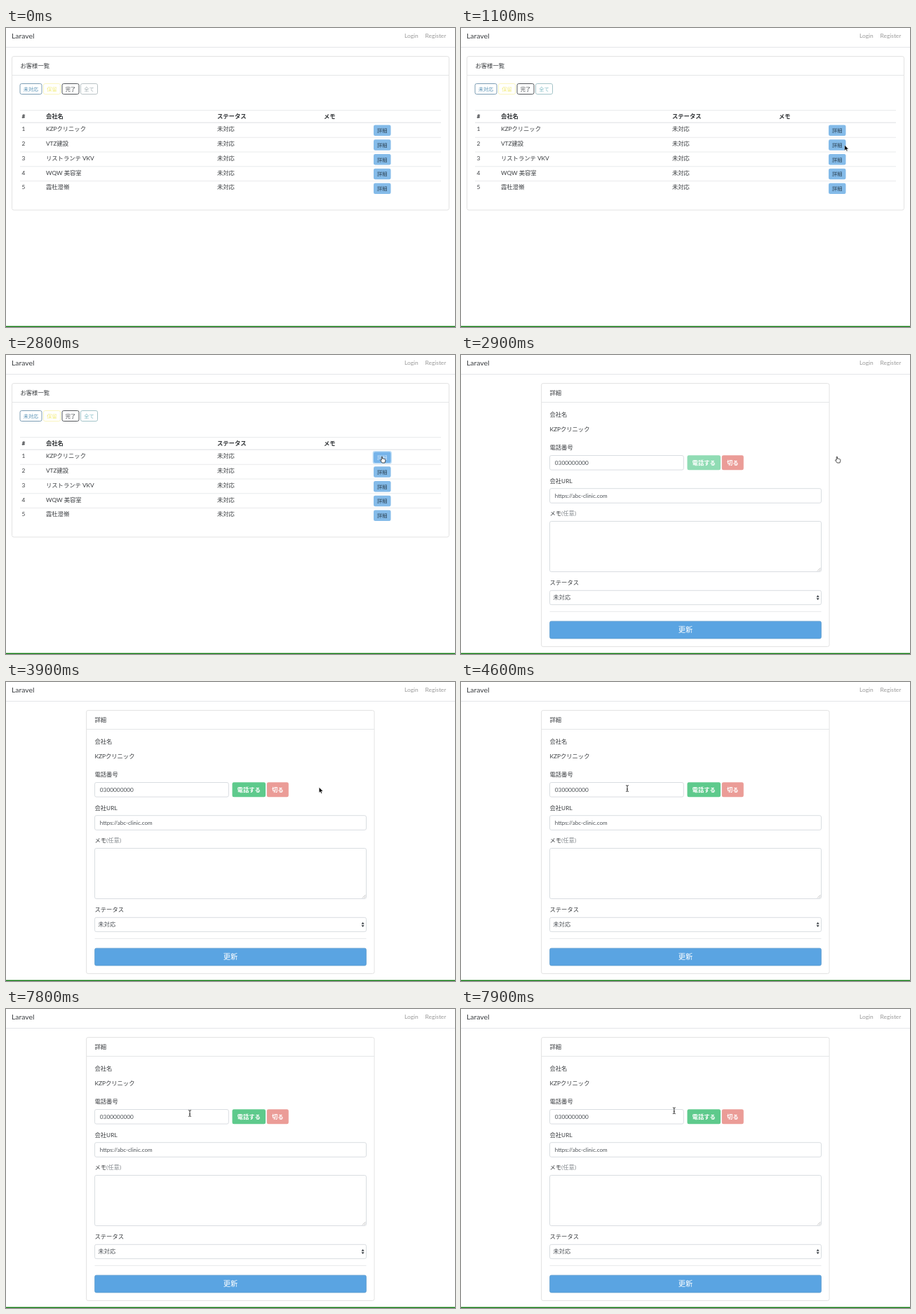
An HTML page that plays this animation: 640x427 px, repeating every 8 s.

```html
<!DOCTYPE html>
<html lang="ja">
<head>
<meta charset="utf-8">
<title>お客様一覧</title>
<style>
  html, body { margin: 0; width: 100%; height: 100%; overflow: hidden; background: #fff; }
  svg { display: block; width: 640px; height: 427px; }
  text { font: 8.3px Lato, "Noto Sans CJK JP", "Noto Sans CJK", sans-serif; fill: #3a3d40; }
  .brand { font-size: 10.4px; }
  .nav { font-size: 8.4px; fill: #999; }
  .head { font-weight: 700; fill: #303336; }
  .small { font-size: 7.2px; }
  .mid { text-anchor: middle; }
  .muted { fill: #858a8f; }
  .field { fill: #4d5257; }
  .white { fill: #fff; }
  .strong { font-weight: 700; }
  .big { font-size: 10.2px; font-weight: 500; }
  .line { stroke: #e4e6e8; fill: none; }
  .frame { stroke: #e3e3e3; fill: #fff; }
  .input { stroke: #d9dde1; fill: #fff; }
</style>
</head>
<body>
<svg id="stage" viewBox="0 0 640 427"></svg>
<script>
const LOOP = 8000;
const stage = document.getElementById('stage');

// Text is placed by its left edge (or middle) and vertical centre.
const text = (x, cy, str, cls = '', extra = '') =>
  `<text x="${x}" y="${cy + 3}" class="${cls}" ${extra}>${str}</text>`;
const box = (x, y, w, h, attrs, r = 2.3) =>
  `<rect x="${x}" y="${y}" width="${w}" height="${h}" rx="${r}" ${attrs}/>`;
const rule = (x1, x2, y, width = 0.8) =>
  `<path class="line" d="M${x1} ${y}H${x2}" stroke-width="${width}"/>`;

const card = (x, w, h, title) =>
  box(x, 40.5, w, h, 'class="frame"', 2.6) + rule(x, x + w, 67.5, 1) +
  text(x + 12, 53.7, title);

const filterButton = (x, w, label, color, border, id = '') =>
  `<g id="${id}" fill="${color}" stroke="${border}">` +
  box(x, 79.5, w, 15, 'fill="#fff"') +
  text(x + w / 2, 86.8, label, 'small mid', 'style="fill:inherit" stroke="none"') + '</g>';

const companies = ['KZPクリニック', 'VTZ建設', 'リストランテ VKV', 'WQW 美容室', '霞杜澄嶺'];

const row = (name, i) => {
  const y = 144.4 + i * 20.75;
  return text(22.5, y, i + 1) + text(57, y, name) + text(301, y, '未対応') +
    (i ? rule(20, 620, 135.5 + i * 20.75) : '') +
    `<g id="detail${i}">` + box(524, y - 6, 24.5, 15.6, 'fill="#84bbe9"') +
    text(536.2, y + 1.6, '詳細', 'small mid', 'style="fill:#2d4355"') + '</g>';
};

const listPage =
  card(8.5, 623, 219.5, 'お客様一覧') +
  filterButton(20, 31, '未対応', '#5b93b6', '#7c9db4') +
  filterButton(53.5, 24, '保留', '#f3ec7c', '#faf5c0') +
  filterButton(80, 24, '完了', '#45494d', '#55595d') +
  filterButton(106.5, 24, '全て', 'inherit', 'inherit', 'all') +
  rule(20, 620, 117.5) + rule(20, 620, 135.2, 1.2) +
  text(22.5, 126, '#', 'head') + text(57, 126, '会社名', 'head') +
  text(301, 126, 'ステータス', 'head') + text(453, 126, 'メモ', 'head') +
  companies.map(row).join('') +
  `<g id="hover">` +
  box(522.6, 137, 27.2, 18.4, 'id="ring" fill="#bcdcf6"', 3) +
  box(524, 138.4, 24.5, 15.6, 'fill="#76b4ea"') +
  text(536.2, 146, '詳細', 'small mid', 'style="fill:#d9ebfa"') + '</g>';

const detailPage =
  card(114.5, 410.5, 376, '詳細') +
  text(126.5, 85, '会社名') + text(126.5, 106.2, companies[0]) +
  text(126.5, 132, '電話番号') +
  box(126.5, 143.5, 190.8, 20.6, 'class="input"') + text(133.8, 154, '0300000000', 'field') +
  box(322.5, 143.2, 47.5, 21, 'id="call"') + text(346.2, 153.6, '電話する', 'white strong mid') +
  box(371.8, 143.2, 31, 21, 'fill="#eb9c97"') + text(387.3, 153.6, '切る', 'white strong mid') +
  text(126.5, 179.5, '会社URL') +
  box(126.5, 190.7, 387, 20.6, 'class="input"') +
  text(133.8, 200.8, 'https://abc-clinic.com', 'field', 'style="font-size:8px"') +
  text(126.5, 226.3, 'メモ<tspan class="muted">(任意)</tspan>') +
  box(126.5, 237.5, 387, 72, 'class="input"') +
  '<path d="M508 308.5l4.5-4.5M510.5 308.5l2-2" stroke="#999" stroke-width=".6"/>' +
  text(126.5, 324.8, 'ステータス') +
  box(126.5, 336.3, 387, 20.3, 'class="input"') + text(131.3, 346.4, '未対応', 'field') +
  '<path d="M506.6 345.7l2-2.8 2 2.8zM506.6 347.3l2 2.8 2-2.8z" fill="#343a40"/>' +
  rule(126.5, 513.5, 366.5) +
  box(126.5, 380.2, 387, 24.8, 'fill="#5aa4e2" stroke="#5b98cb" stroke-width=".7"') +
  text(320, 392.6, '更新', 'white big mid', 'style="letter-spacing:0"');

const pointers = {
  arrow: '<path d="M0 0V7.6L1.8 6 3 8.7 4.2 8.2 3.1 5.6H5.5Z" fill="#000" stroke="#fff" stroke-width=".4"/>',
  hand: '<path d="M1.6 5V1Q2.3-.2 3 1V3.2Q4-.1 0 0L1.6 5Z" fill="none"/>' +
    '<path d="M2 5.4V.9C2-.2 3.3-.2 3.3.9V3.1C4.1 2.6 4.7 2.9 4.8 3.4 5.5 3 6.1 3.2 6.2 3.8 6.9 3.5 7.6 3.8 7.6 4.6V6.3L6.7 9H3L.4 5.6C0 4.9.9 4.4 1.4 4.9Z" fill="#fff" stroke="#222" stroke-width=".8"/>',
  beam: '<path d="M-1.9-4.4Q0-4.4 0-3.4 0-4.4 1.9-4.4M0-3.6V3.6M-1.9 4.4Q0 4.4 0 3.4 0 4.4 1.9 4.4M-1 1H1" fill="none" stroke="#222" stroke-width=".9"/>'
};

stage.innerHTML =
  '<rect width="640" height="427" fill="#fff"/>' +
  text(8, 11.8, 'Laravel', 'brand') + text(568, 11.3, 'Login', 'nav') +
  text(597.5, 11.3, 'Register', 'nav') + rule(0, 640, 27.5, 1) +
  `<g id="list">${listPage}</g><g id="form">${detailPage}</g>` +
  '<rect y="425.6" width="640" height="1.4" fill="#117a11"/>' +
  Object.entries(pointers).map(([k, p]) => `<g id="${k}">${p}</g>`).join('');

// Pointer poses: start time, kind, x, y
const poses = [
  [500, 'arrow', 505, 285], [600, 'arrow', 522, 258], [700, 'arrow', 534, 230],
  [800, 'arrow', 540.5, 207], [1000, 'arrow', 545.5, 184], [1100, 'arrow', 546.8, 167.3],
  [1200, 'arrow', 545, 158], [1300, 'hand', 538, 148], [1400, 'hand', 534, 146],
  [1500, 'hand', 533.2, 145],
  [3900, 'arrow', 446.3, 150.5], [4000, 'arrow', 398, 157], [4100, 'hand', 346, 160],
  [4200, 'beam', 302, 160], [4300, 'beam', 273, 158.5], [4400, 'beam', 255, 156],
  [4500, 'beam', 244, 154], [4600, 'beam', 237, 152], [4700, 'beam', 232.7, 151],
  [5300, 'beam', 232.2, 151.2], [5500, 'beam', 231, 152], [5600, 'beam', 229.4, 152.6],
  [5800, 'beam', 228.6, 152.8], [7800, 'beam', 262, 149], [7900, 'beam', 303.8, 145.2]
];

const byId = id => document.getElementById(id);
const show = (id, on) => byId(id).setAttribute('visibility', on ? 'inherit' : 'hidden');

function draw(t) {
  const onList = t < 2900;
  show('list', onList);
  show('form', !onList);
  show('hover', t >= 1300);
  show('ring', t >= 2100);
  byId('call').setAttribute('fill', t < 3200 ? '#90dcb4' : '#5eca8c');
  const all = byId('all');
  all.setAttribute('fill', t < 300 ? '#a4b0b4' : '#82bcc6');
  all.setAttribute('stroke', t < 300 ? '#b9c2c5' : '#a3c3c8');

  const pose = poses.filter(p => p[0] <= t).pop();
  for (const kind in pointers) show(kind, pose && pose[1] === kind);
  if (pose) byId(pose[1]).setAttribute('transform', `translate(${pose[2]} ${pose[3]})`);
}

const start = performance.now();
function tick() {
  draw((performance.now() - start) % LOOP);
  requestAnimationFrame(tick);
}
draw(0);
requestAnimationFrame(tick);
</script>
</body>
</html>
```
